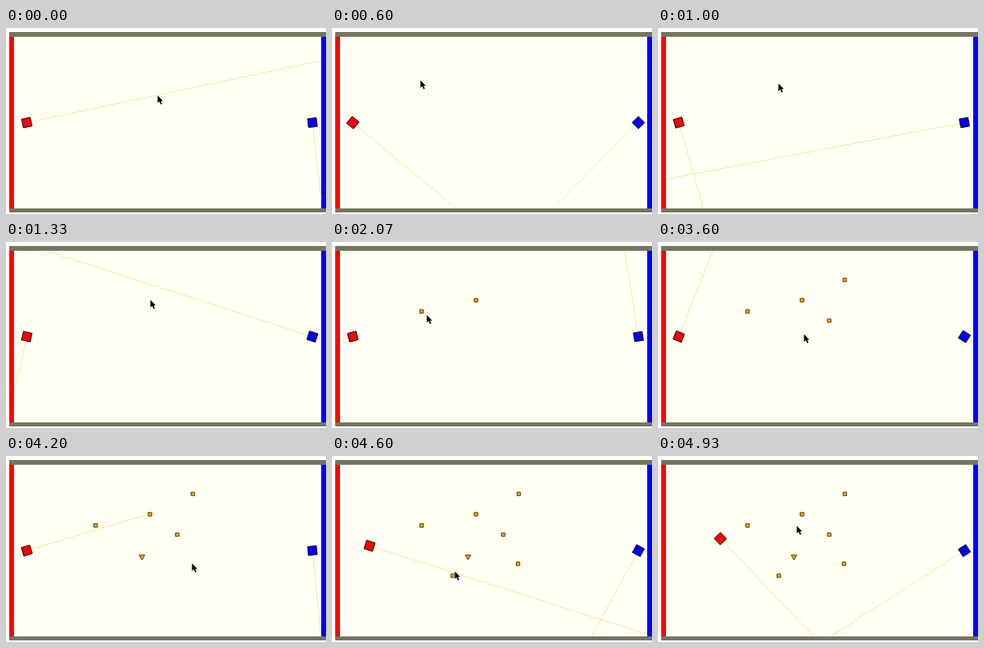
An HTML page with a canvas for the animation above (4990 ms loop, 400x233 px).

```html
<!DOCTYPE html>
<html lang="en">
<head>
<meta charset="utf-8">
<title>Scanning robots</title>
<style>
  html, body { margin: 0; width: 100%; height: 100%; overflow: hidden; background: #fff; }
  canvas { display: block; width: 400px; height: 233px; }
</style>
</head>
<body>
<canvas id="stage" width="400" height="233"></canvas>
<script>
const ctx = document.getElementById('stage').getContext('2d');
const LOOP = 4990;
const STEP = 200 / 3;             // simulation step in ms
const TURN = 0.1;                 // radians per step
const SIGHTED = 63;               // step at which red spots a target
const LAST = 74;
const ARENA = { left: 10, top: 11, right: 394, bottom: 226 };
const rad = deg => deg * Math.PI / 180;

// Items the pointer drops, in order
const items = [
  { x: 180, y: 73, at: 1400 },
  { x: 112, y: 87, at: 2000 },
  { x: 214, y: 98.5, at: 2530 },
  { x: 233.5, y: 47.5, at: 2870 },
  { x: 170, y: 127, at: 3900, sides: 3 },
  { x: 232.5, y: 135, at: 4270 },
  { x: 151, y: 150, at: 4600 }
];

// The pointer reaches each item one step before it appears, with a few rests between
const path = [
  ...items.map(({ x, y, at }) => ({ x, y: y - 1, at: at - STEP })),
  { x: 189, y: 84, at: 0 },
  { x: 110, y: 65, at: 600 },
  { x: 118, y: 91, at: 2070 },
  { x: 233, y: 70, at: 3000 },
  { x: 173, y: 87, at: 4930 }
].sort((a, b) => a.at - b.at);

function pointerAt(t) {
  const i = path.findIndex(p => p.at > t);
  if (i < 0) return path[path.length - 1];
  const a = path[i - 1], b = path[i];
  const u = (t - a.at) / (b.at - a.at), e = u * u * (3 - 2 * u);
  return { x: a.x + (b.x - a.x) * e, y: a.y + (b.y - a.y) * e };
}

// Regular polygon; the first corner points along the given angle
function polygon({ x, y, sides, radius, angle, fill, line }) {
  ctx.beginPath();
  for (let i = 0; i < sides; i++) {
    const a = angle + i * 2 * Math.PI / sides;
    ctx.lineTo(x + radius * Math.cos(a), y + radius * Math.sin(a));
  }
  ctx.closePath();
  ctx.fillStyle = fill;
  ctx.fill();
  ctx.lineWidth = 1;
  ctx.strokeStyle = line;
  ctx.stroke();
}

// Distance along a ray to the nearest wall or item
function reach({ x, y, angle }, seen) {
  const dx = Math.cos(angle), dy = Math.sin(angle);
  let d = Math.min(
    ((dx > 0 ? ARENA.right : ARENA.left) - x) / dx,
    ((dy > 0 ? ARENA.bottom : ARENA.top) - y) / dy
  );
  for (const o of seen) {
    const along = (o.x - x) * dx + (o.y - y) * dy;
    const off = Math.abs((o.x - x) * dy - (o.y - y) * dx);
    if (along > 0 && off < 2.5) d = Math.min(d, along - 2);
  }
  return d;
}

function drawBeam(bot, seen) {
  const d = reach(bot, seen);
  ctx.strokeStyle = '#efeb9c';
  ctx.lineWidth = 1;
  ctx.beginPath();
  ctx.moveTo(bot.x, bot.y);
  ctx.lineTo(bot.x + d * Math.cos(bot.angle), bot.y + d * Math.sin(bot.angle));
  ctx.stroke();
}

function drawBot({ x, y, angle, fill }) {
  polygon({ x, y, fill, sides: 4, radius: 7.8, angle: angle + Math.PI / 4, line: '#100' });
}

function drawItem({ x, y, sides = 4 }) {
  const triangle = sides === 3;
  polygon({
    x, y: triangle ? y - 1 : y, sides,
    radius: triangle ? 4 : 3.1,
    angle: triangle ? Math.PI / 2 : Math.PI / 4,
    fill: '#ffa500', line: '#5a3c00'
  });
}

const arrow = new Path2D('M0 0V9.5L2.2 7.6L4 11.3L5.6 10.5L3.9 7H6.8Z');

function drawPointer({ x, y }) {
  ctx.save();
  ctx.translate(Math.round(x) + 0.5, Math.round(y) + 0.5);
  ctx.lineWidth = 1;
  ctx.strokeStyle = '#fff';
  ctx.stroke(arrow);
  ctx.fillStyle = '#000';
  ctx.fill(arrow);
  ctx.restore();
}

function drawArena() {
  const { left, top, right, bottom } = ARENA;
  const rect = (color, x, y, w, h) => { ctx.fillStyle = color; ctx.fillRect(x, y, w, h); };
  rect('#fff', 0, 0, 400, 233);
  rect('#fffff4', left, top, right - left, bottom - top);
  rect('#75755f', left - 6, top - 6, 396, 6);
  rect('#75755f', left - 6, bottom, 396, 5);
  rect('#f00', left - 6, top, 6, bottom - top);
  rect('#00f', right, top, 6, bottom - top);
}

function render(t) {
  // Steps show on a 10 ms clock
  const tick = Math.floor(t / 10) * 10;
  const step = Math.min(LAST, Math.floor((tick + 4) / STEP));
  const now = Math.round(step * STEP / 10) * 10;
  const seen = items.filter(o => o.at <= now);

  // Red misses one turn midway, then drives towards what it sighted
  const redTurns = step > 31 ? step - 1 : step;
  const drive = Math.pow(Math.max(0, step - SIGHTED) / (LAST - SIGHTED), 1.5);
  const red = {
    x: 26 + 52 * drive, y: 118.5 - 15 * drive,
    angle: rad(-11.9) + TURN * redTurns, fill: '#f00'
  };
  const blue = { x: 383, y: 118.5, angle: rad(83.3) + TURN * step, fill: '#00f' };

  drawArena();
  [red, blue].forEach(bot => drawBeam(bot, seen));
  seen.forEach(drawItem);
  [red, blue].forEach(drawBot);
  drawPointer(pointerAt(now));
}

const start = performance.now();
function frame() {
  render((performance.now() - start) % LOOP);
  requestAnimationFrame(frame);
}
frame();
</script>
</body>
</html>
```
